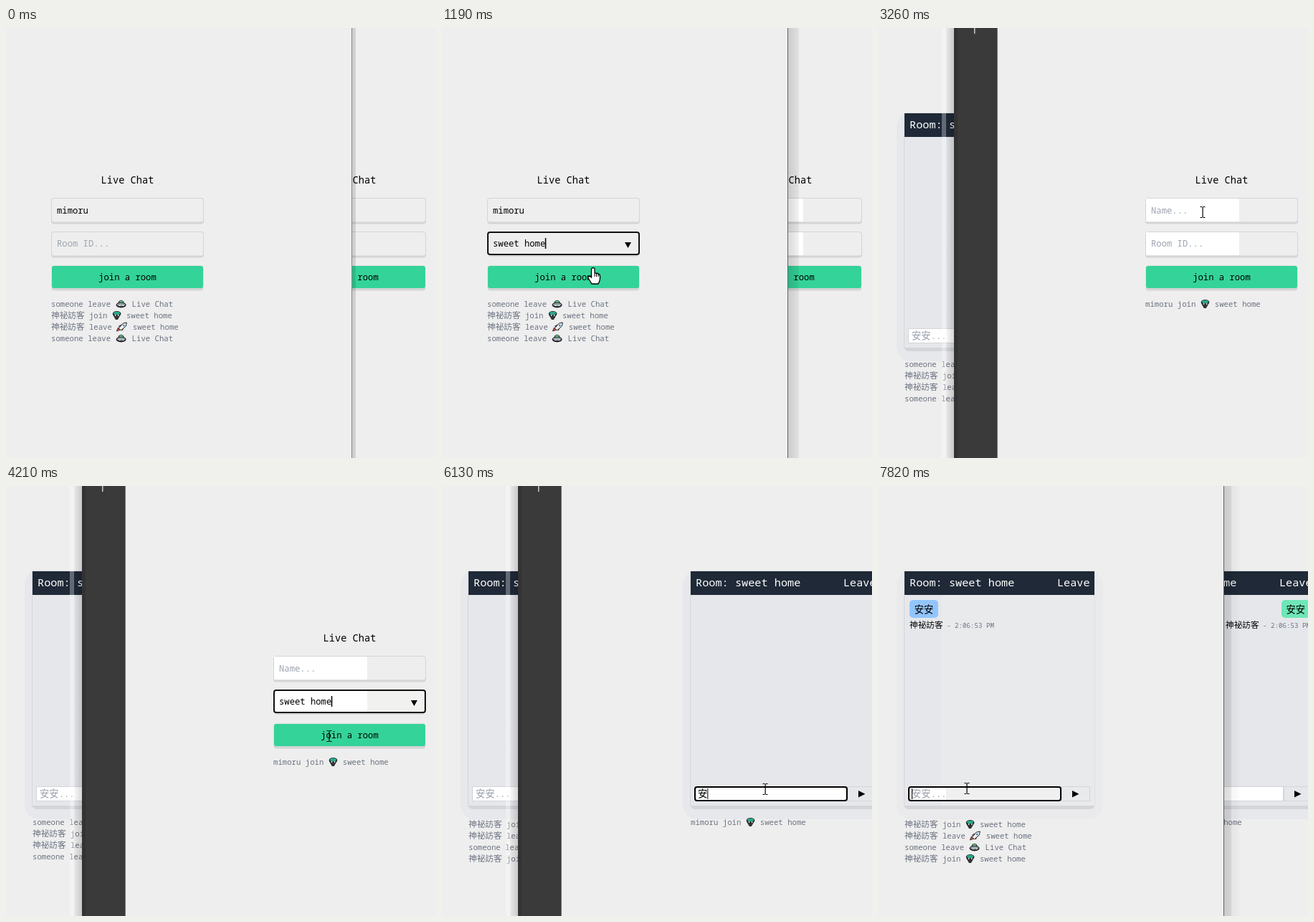
Animation of 600 by 600 pixels, one loop 8 s. Source, as an HTML page with a canvas:

```html
<!DOCTYPE html>
<html lang="en">
<head>
<meta charset="utf-8">
<title>Live Chat</title>
<style>
  html, body { margin: 0; width: 100%; height: 100%; overflow: hidden; background: #eee; }
  canvas { display: block; }
</style>
</head>
<body>
<canvas id="stage" width="600" height="600"></canvas>
<script>
const c = document.getElementById('stage').getContext('2d');
const LOOP = 8000, TICK = 120.4, LAST = 65;
const BG = '#eee', LINE = '#d4d5d6', MUTED = '#6b7280', HINT = '#9ca3af';
const MONO = '"Noto Sans Mono", "DejaVu Sans Mono", monospace';
const CJK = '"Noto Sans CJK TC", "Noto Sans CJK", "Noto Sans CJK JP", sans-serif';
const USER = 'mimoru', GUEST = '神祕訪客';
const SAUCER = 'someone leave 🛸 Live Chat';
const JOIN = GUEST + ' join 🪂 sweet home';
const LEAVE = GUEST + ' leave 🚀 sweet home';

// Pointer path: tick, x, y, shape (i = text beam, a = arrow, h = hand)
const PATH = [
  [1, 280, 420, 'a'], [3, 150, 300, 'i'], [4, 150, 300, 'i'], [5, 150, 328, 'a'],
  [7, 160, 328, 'a'], [8, 192, 299, 'i'], [10, 211, 335, 'h'], [11, 211, 335, 'h'],
  [12, 240, 330, 'a'], [14, 450, 300, 'a'], [17, 555, 236, 'a'], [22, 560, 240, 'a'],
  [23, 569, 301, 'i'], [24, 534, 263, 'i'], [25, 415, 445, 'a'], [26, 425, 336, 'h'],
  [27, 453, 257, 'i'], [28, 461.5, 248, 'i'], [29, 461.5, 259, 'i'], [31, 455, 300, 'i'],
  [32, 453, 330, 'a'], [34, 451, 340, 'a'], [35, 451, 349, 'i'], [36, 451, 347, 'h'],
  [38, 451, 380, 'a'], [41, 451, 423, 'i'], [57, 451, 423, 'i'], [58, 330, 400, 'a'],
  [60, 89, 322, 'a'], [61, 96, 380, 'a'], [62, 118, 505, 'a'], [63, 122, 460, 'a'],
  [64, 124, 422, 'i'], [65, 124, 422, 'i']
];

function rect(x, y, w, h, fill) { c.fillStyle = fill; c.fillRect(x, y, w, h); }

function round(x, y, w, h, r, fill, stroke, width = 1) {
  c.beginPath();
  c.roundRect(x, y, w, h, r);
  if (fill) { c.fillStyle = fill; c.fill(); }
  if (stroke) { c.strokeStyle = stroke; c.lineWidth = width; c.stroke(); }
}

function poly(points, fill, stroke, width = 1) {
  c.beginPath();
  for (let i = 0; i < points.length; i += 2) c.lineTo(points[i], points[i + 1]);
  c.closePath();
  if (fill) { c.fillStyle = fill; c.fill(); }
  if (stroke) { c.strokeStyle = stroke; c.lineWidth = width; c.lineJoin = 'round'; c.stroke(); }
}

function at(x, y, draw) { c.save(); c.translate(x, y); draw(); c.restore(); }

function clip(x, w, draw) {
  c.save();
  c.beginPath();
  c.rect(x, 0, w, 600);
  c.clip();
  draw();
  c.restore();
}

function ellipse(x, y, rx, ry, fill) {
  c.beginPath();
  c.ellipse(x, y, rx, ry, 0, 0, 7);
  c.fillStyle = fill;
  c.fill();
}

// Small icons: advance width and drawing around the line's centre
const ICONS = {
  '🛸': [16.6, () => {
    ellipse(8, 0, 4.3, 5.3, '#222');
    ellipse(8, -1, 3, 3.6, '#5fc98a');
    ellipse(8, 1.5, 7, 3.8, '#222');
    ellipse(8, 1, 5.8, 2.2, '#9aa8b0');
    rect(5, 2, 2, 1, '#fff');
    rect(10, 2, 2, 1, '#fff');
  }],
  '🪂': [13.6, () => {
    poly([1, -1, 12, -1, 8, 6, 5, 6], '#333');
    ellipse(6.7, -2.5, 5.8, 3.6, '#222');
    ellipse(6.7, -3, 4.6, 2.2, '#27a98b');
    rect(4, -1, 1.5, 2, '#ddd');
    rect(8, -1, 1.5, 2, '#ddd');
  }],
  '🚀': [16, () => {
    poly([0, 6, 2, 1, 6, 4], '#e2493b', '#222', .8);
    poly([3, -1, 7, -3, 10, 1, 8, 5], '#d95145', '#222', .8);
    poly([3, 2, 9, -5, 14, -6, 13, -1, 6, 5], '#eef2f5', '#222');
    ellipse(10, -2, 1.5, 1.5, '#4292c6');
  }]
};

// Draws mixed text with the given column width; returns the end position
function text(s, x, y, col, color = '#000') {
  for (const part of s.split(/(\p{Extended_Pictographic}|[\u3100-\u312f\u4e00-\u9fff]+)/u)) {
    if (!part) continue;
    if (ICONS[part]) {
      at(x, y - 4, ICONS[part][1]);
      x += ICONS[part][0];
      continue;
    }
    const wide = part.charCodeAt(0) > 0x3000;
    c.font = wide ? `${col / .55}px ${CJK}` : `${col / .6}px ${MONO}`;
    c.fillStyle = color;
    c.fillText(part, x, y);
    x += wide ? part.length * col / .55 : part.length * col;
  }
  return x;
}

function centred(s, y, col) { text(s, 169.5 - s.length * col / 2, y, col); }

function logs(lines, x, y) {
  lines.forEach((s, i) => text(s, x, y + 16 * i, 6.4, MUTED));
}

function field(y, value, hint, focus, lit) {
  round(63, y, 213, 36.5, 4, LINE);
  round(64, y + 1, 211, 32.5, 3, BG);
  if (lit) rect(64, y + 1, 130, 32, '#fff');
  if (focus) {
    round(63, y, 213, 37, 0, BG);
    round(66, y + 33, 207, 2, 1, LINE);
    round(64, y + 1, 211, 31, 3, lit ? '#f1f1f0' : BG);
    if (lit) rect(64, y + 1, 130, 31, '#fff');
    round(64, y + 1, 211, 31, 3, null, '#111', 2);
    poly([255, y + 15, 264, y + 15, 259.5, y + 23], '#000');
  }
  const end = text(value || hint, 71, y + (y > 260 ? 21 : 22), 7.33, value ? '#000' : HINT);
  if (focus) rect(value ? end - .5 : 71, y + 9, 1.5, 15, '#000');
}

function login(s) {
  centred('Live Chat', 217, 8.2);
  field(237, s.name, 'Name...', false, s.lit);
  field(284, s.room, 'Room ID...', s.focus, s.lit);
  round(63.5, 331.5, 212, 35, 4, LINE);
  round(64, 332, 211, 31, 3, '#34d399');
  centred('join a room', 352, 7.33);
  logs(s.logs, 63, 389);
  if (s.list) {
    round(63.5, 318.5, 212, 23, 2, '#fff', '#bbb');
    text('sweet home', 71, 334, 7.33);
  }
}

function room(s) {
  round(26, 118, 288, 347, 20, s.faded ? '#eaeaec' : '#e7e8ec');
  round(36, 118.5, 266.5, 332.5, [1, 1, 7, 7], '#d3d5d9');
  rect(37, 119, 265, 327, s.faded ? '#e9eaec' : '#e5e7eb');
  if (s.faded) rect(37, 119, 52, 327, '#e5e7eb');
  rect(37, 119, 265, 33, '#1f2937');
  text('Room: sweet home', 44, 140, 9.15, '#fff');
  text('Leave', 250, 140, 9.1, '#fff');

  if (s.message) {
    const own = s.message === 'own';
    round(own ? 253 : 44, 159, 40, 25, 5, own ? '#6ee7b7' : '#93c5fd');
    text('安安', own ? 259.5 : 50.7, 177, 7.33);
    const x = own ? 175 : 44;
    text(GUEST, x, 198, 6.4);
    text('- 2:06:53 PM', x + 52, 198, 5.5, MUTED);
  }

  rect(42, 419, 214, 21, LINE);
  rect(43, 420, 212, 19, s.faded ? '#f0f0f0' : '#fff');
  if (s.faded) rect(44, 420, 51, 19, '#fff');
  c.strokeStyle = LINE;
  c.lineWidth = 1;
  c.strokeRect(256.5, 419.5, 39, 20);
  poly([271, 425, 271, 434.5, 280.5, 429.7], '#000');
  if (s.focus) round(43, 420, 212, 19, 3, null, '#000', 2);
  const end = text(s.draft || '安安...', 47, 434, 7.33, s.draft ? '#000' : HINT);
  if (s.caret) rect(s.draft ? end : 47, 422, 1, 15, '#000');
  logs(s.logs, 37, s.logs[0].startsWith(GUEST) ? 476 : 473);
}

function leftPage(k) {
  const old = [SAUCER, JOIN, LEAVE, SAUCER];
  if (k < 12) {
    login({ name: USER, room: k >= 7 ? 'sweet home' : '', focus: k >= 4, list: k > 4 && k < 7, logs: old });
  } else {
    room({
      logs: k < 38 ? old : [JOIN, LEAVE, SAUCER, JOIN],
      message: k >= 56 && 'other', faded: k >= 61, focus: k >= 64, caret: k >= 65
    });
  }
}

function rightPage(k) {
  const news = k >= 12 ? [USER + ' join 🪂 sweet home'] : [];
  at(310, 0, () => {
    if (k < 38) {
      login({
        room: k >= 35 ? 'sweet home' : '', focus: k >= 31, list: k > 31 && k < 35,
        lit: k >= 3, logs: news
      });
    } else {
      room({
        logs: news, message: k >= 55 && 'own', focus: k >= 41 && k < 61,
        caret: k === 42 || k === 43 || (k >= 47 && k < 55),
        draft: k < 49 || k >= 55 ? '' : k < 51 ? 'ㄢ' : k < 53 ? '安' : '安安'
      });
    }
  });
}

function shade(x, w, from, to) {
  const g = c.createLinearGradient(x, 0, x + w, 0);
  g.addColorStop(0, `rgba(0,0,0,${from})`);
  g.addColorStop(1, `rgba(0,0,0,${to})`);
  rect(x, 0, w, 600, g);
}

function pointer(k) {
  const next = PATH.findIndex(p => p[0] >= k);
  if (k < PATH[0][0] || next < 0) return;
  const b = PATH[next], a = PATH[Math.max(0, next - 1)];
  const f = b[0] === a[0] ? 1 : (k - a[0]) / (b[0] - a[0]);
  const shape = f === 1 ? b[3] : a[3];
  at(a[1] + (b[1] - a[1]) * f, a[2] + (b[2] - a[2]) * f, () => {
    if (shape === 'i') {
      rect(-.5, -7, 1.2, 14, '#000');
      for (const y of [-8, 7]) { rect(-3.5, y, 3, 1, '#000'); rect(.5, y, 3, 1, '#000'); }
    } else if (shape === 'a') {
      poly([0, 0, 0, 16, 4, 12.5, 6.5, 18, 9, 17, 6.5, 11.5, 11.5, 11.5], '#fff', '#000');
    } else {
      c.beginPath();
      c.moveTo(-2.5, 1);
      c.quadraticCurveTo(0, -2, 2, 1);
      c.lineTo(2, 7);
      c.quadraticCurveTo(9, 7, 9.5, 11);
      c.quadraticCurveTo(10, 17, 7, 22);
      c.lineTo(-2, 22);
      c.lineTo(-7.5, 13);
      c.quadraticCurveTo(-6, 10, -2.5, 13);
      c.closePath();
      c.fillStyle = '#fff';
      c.fill();
      c.strokeStyle = '#000';
      c.lineWidth = 1.3;
      c.stroke();
      for (const x of [2, 4.5, 7]) rect(x - .5, 8, 1, 4, '#000');
    }
  });
}

function draw(now) {
  const k = Math.min(LAST, Math.floor((now % LOOP + 17) / TICK));
  rect(0, 0, 600, 600, BG);
  if (k >= 18 && k < 61) {
    leftPage(k);
    shade(95, 12, .02, .17);
    rect(89, 0, 6, 600, 'rgba(255,255,255,.3)');
    clip(106, 494, () => {
      rect(106, 0, 494, 600, BG);
      rect(106, 0, 61, 600, '#3a3a3a');
      rect(106, 0, 5, 600, '#333');
      rect(134, 0, 1.5, 8, '#ccc');
      rect(166, 0, 1, 600, '#777');
      clip(167, 433, () => rightPage(k));
    });
  } else {
    rightPage(k);
    shade(483, k < 3 ? 5 : k < 18 ? 15 : 10, .15, k < 18 && k >= 3 ? .05 : .11);
    if (k >= 61) shade(493, 11, .04, .01);
    rect(482, 0, 1, 600, k < 3 ? '#8a8a8a' : '#60646a');
    clip(0, 482, () => {
      rect(0, 0, 482, 600, BG);
      leftPage(k);
    });
  }
  pointer(k);
}

const start = performance.now();
function frame() {
  draw(performance.now() - start);
  requestAnimationFrame(frame);
}
frame();
</script>
</body>
</html>
```
